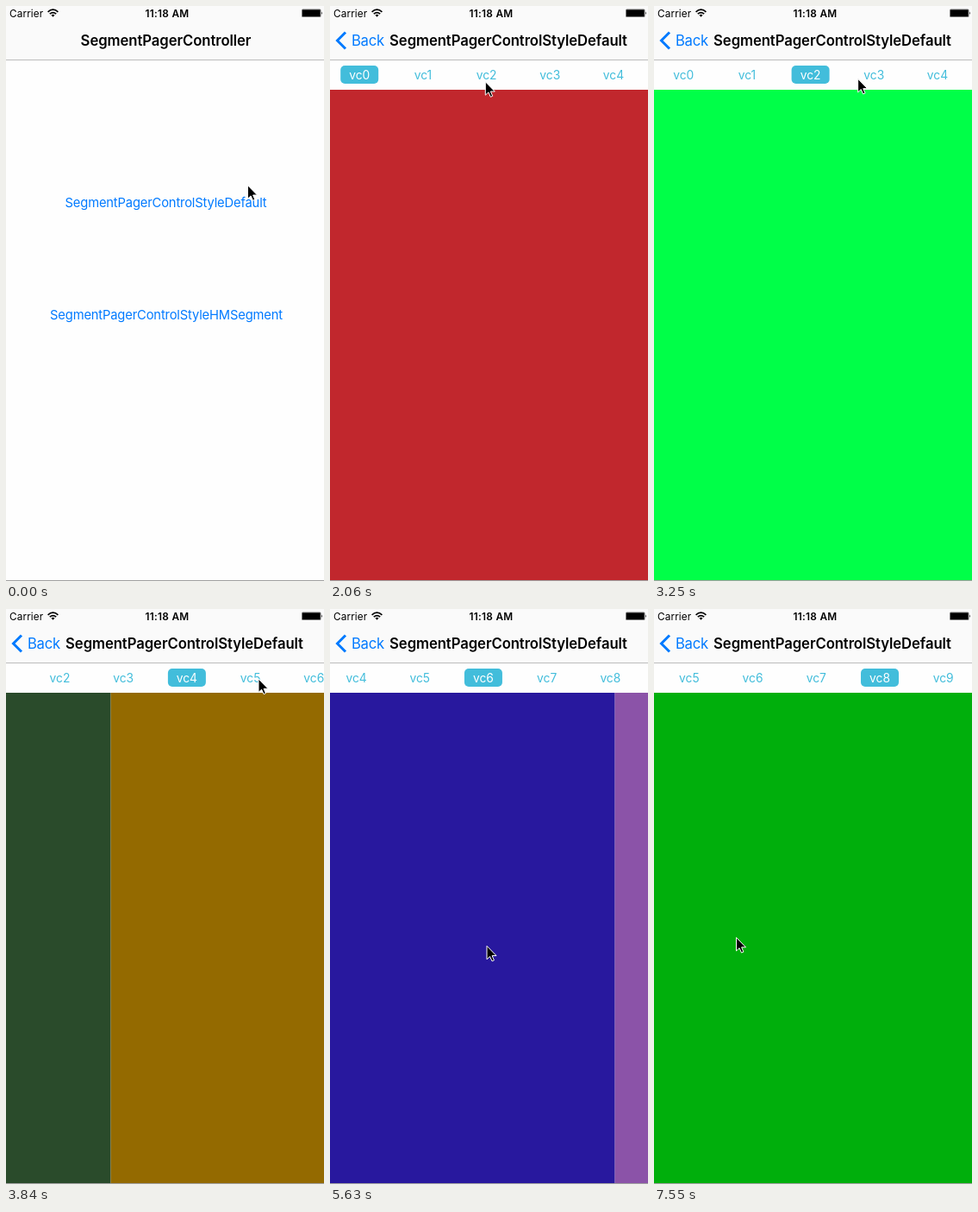
Write an HTML page that moves like this. It is 369 by 666 pixels and loops after 8000 ms.

```html
<!DOCTYPE html>
<html lang="en">
<head>
<meta charset="utf-8">
<title>Segment pager</title>
<style>
  html, body { margin: 0; width: 100%; height: 100%; overflow: hidden; background: #fff; }
  svg { display: block; width: 369px; height: 666px; font-family: Inter, Roboto, sans-serif; }
  .mid { text-anchor: middle; }
  .link { font-size: 14.76px; letter-spacing: -.17px; fill: #007aff; }
  .title { font-size: 16.7px; font-weight: 600; letter-spacing: -.08px; }
  .back { font-size: 16.7px; letter-spacing: -.3px; fill: #007aff; }
  .status { font-size: 11.8px; letter-spacing: .1px; }
  .time { font-weight: 600; letter-spacing: .3px; }
  .tab { font-size: 13.8px; fill: #42bddb; }
  .tab.on { fill: #fff; }
</style>
</head>
<body>
<svg viewBox="0 0 369 666">
  <rect width="369" height="666" fill="#fefefe"/>
  <g id="home" class="link mid">
    <text x="185.5" y="232.5">SegmentPagerControlStyleDefault</text>
    <text x="186" y="362.5">SegmentPagerControlStyleHMSegment</text>
  </g>
  <g id="pager">
    <rect y="63" width="369" height="603" fill="#fefefe"/>
    <svg y="97" width="369" height="569"><g id="pages"/></svg>
    <svg y="63" width="369" height="34">
      <g id="bar">
        <rect id="pill" y="69" width="44" height="21" rx="5" fill="#42bddb"/>
      </g>
    </svg>
  </g>
  <rect y="665" width="369" height="1" fill="#a0a0a0"/>

  <rect width="369" height="63" fill="#fafafa"/>
  <rect y="62" width="369" height="1" fill="#bcbcbc"/>
  <text id="oldTitle" class="title mid" x="185.5" y="46">SegmentPagerController</text>
  <text id="newTitle" class="title mid" x="207" y="46">SegmentPagerControlStyleDefault</text>
  <g id="back">
    <path d="M18 30.5L8.5 40L18 49.5" fill="none" stroke="#007aff" stroke-width="3"/>
    <text id="backText" class="back" x="25" y="46">Back</text>
  </g>

  <text class="status" x="4" y="12.5">Carrier</text>
  <text class="status time mid" x="187" y="12.5">11:18 AM</text>
  <path d="M48.6 6.9Q54.5 1.5 60.4 6.9M50.8 9.2Q54.5 5.9 58.2 9.2"
        fill="none" stroke="#000" stroke-width="1.7"/>
  <path d="M52.5 10.6Q54.5 8.9 56.5 10.6L54.5 12.7Z"/>
  <rect x="343" y="3.5" width="22.5" height="9.5" rx="1.5" fill="#777"/>
  <rect x="344" y="4.5" width="20.5" height="7.5"/>
  <path d="M366.3 6.5q1.7 1.7 0 3.5z"/>
  <path id="cursor" d="M0 0V15.5L3.6 12.2L6 17.6L8.4 16.6L6.1 11.3H11Z"
        stroke="#fff" stroke-linejoin="round"/>
</svg>
<script>
const W = 369, GAP = 73.7, FIRST = 34.2, BAR_CENTER = 185.6, BAR_MAX = 361.8;
const STEP = 148, STEPS = 54, LOOP = 8000;
const colors = ['#c1272d', '#f1bb5c', '#00ff48', '#2a4b2b', '#946a00',
                '#5a6a8c', '#28189e', '#8b53a8', '#00af0c', '#d08040'];

// Each move: start and length in steps, then where it ends
const hand = [
  [0, 4, 235, 231],          // press the first link
  [8, 5, 163.5, 88.5],
  [13, 1, 180.3, 87.7],      // tap vc2
  [20, 4, 293, 81],          // tap vc4
  [27, 1, 318, 82],          // tap vc6
  [30, 2, 159.5, 308.5],
  [35, 2, 240, 388.5],
  [37, 2, 124, 392],         // swipe
  [44, 1, 153.5, 388.5],
  [45, 1, 244, 380.5],
  [47, 3, 95.5, 380.5]       // swipe
];
const scrolls = [[15.21, 2, 2], [24.515, 2, 4], [28.3, 2, 6], [37, 5, 7], [47, 4, 8]];
const PICK_LEAD = 2;         // a tab lights up this long before its page rests

const $ = id => document.getElementById(id);
const clamp = (v, lo, hi) => Math.min(hi, Math.max(lo, v));
const smooth = u => u * u * (3 - 2 * u);
const center = i => FIRST + GAP * i;
const move = (id, x, y = 0) => $(id).setAttribute('transform', `translate(${x} ${y})`);

function add(parent, tag, attrs, text = '') {
  const el = document.createElementNS('http://www.w3.org/2000/svg', tag);
  for (const k in attrs) el.setAttribute(k, attrs[k]);
  el.textContent = text;
  return $(parent).appendChild(el);
}

// Applies every move begun by step s to the starting values
function run(from, moves, s) {
  return moves.reduce((now, [at, len, ...to]) => {
    const p = smooth(clamp((s - at) / len, 0, 1));
    return now.map((v, i) => v + (to[i] - v) * p);
  }, from);
}

colors.forEach((fill, i) => add('pages', 'rect', { x: i * W, width: W, height: 568, fill }));
const tabs = colors.map((_, i) =>
  add('bar', 'text', { x: center(i), y: 84.5, class: 'tab mid' }, 'vc' + i));

function draw(s) {
  const push = 1 - (1 - clamp((s - 5.67) / 3.33, 0, 1)) ** 3;
  move('home', -.3 * W * push);
  move('pager', W * (1 - push));
  move('oldTitle', -140 * push);
  move('newTitle', 160 * (1 - push));
  move('backText', 120 * (1 - push));
  $('oldTitle').style.opacity = 1 - push;
  $('newTitle').style.opacity = $('back').style.opacity = push;

  const [page] = run([0], scrolls, s);
  const pick = scrolls.reduce((now, [at, len, to]) => s >= at + len - PICK_LEAD ? to : now, 0);
  move('pages', -W * page);
  move('bar', -clamp(center(page) - BAR_CENTER, 0, BAR_MAX), -63);
  $('pill').setAttribute('x', center(pick) - 22);
  tabs.forEach((tab, i) => tab.classList.toggle('on', i === pick));
  move('cursor', ...run([280.5, 207.7], hand, s));
}

// The screen is refreshed in even steps
function tick() {
  const t = performance.now() % LOOP;
  draw(Math.min(STEPS - 1, Math.floor((t + 17) / STEP)));
  requestAnimationFrame(tick);
}
tick();
</script>
</body>
</html>
```
